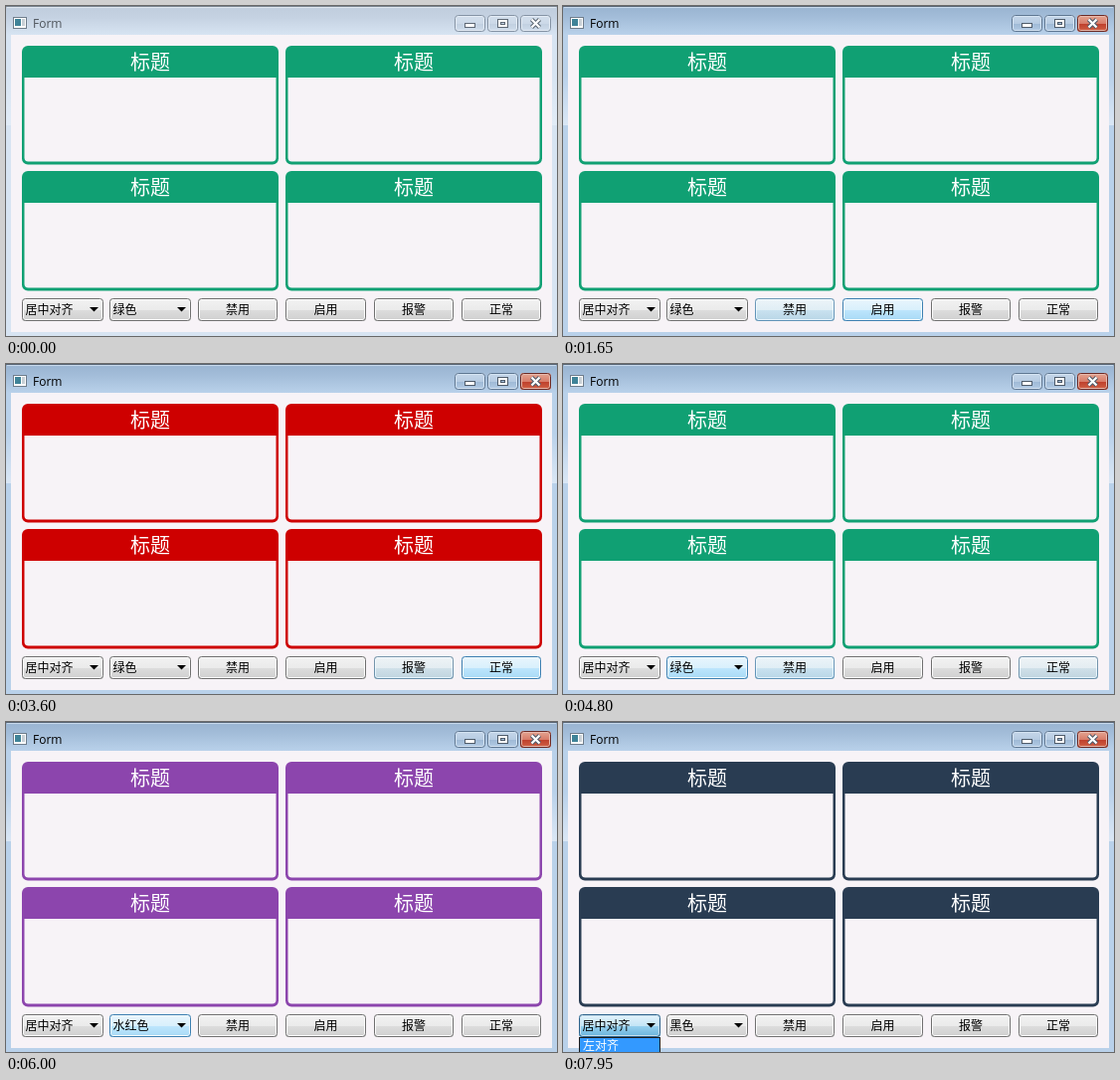
Animation of 554x332 px, one loop 8 s. Source, as an HTML page with a canvas:

```html
<!DOCTYPE html>
<html lang="zh-CN">
<head>
<meta charset="utf-8">
<title>Form</title>
<style>
html, body { margin: 0; width: 554px; height: 332px; overflow: hidden; }
canvas { display: block; }
</style>
</head>
<body>
<canvas id="stage" width="554" height="332"></canvas>
<script>
const ctx = document.getElementById('stage').getContext('2d');
const LOOP = 8000, STEP = 150, FADE = 750;
const CJK = '"Noto Sans CJK SC", "Noto Sans CJK", sans-serif';
const UI = '"Open Sans", "Noto Sans", sans-serif';

const GREEN = '#10a073', RED = '#ce0000', PURPLE = '#8c45ad', BLACK = '#293c52';
const ACTIVATE = 750, OPEN_LIST = 7950;

// [start, panel colour, colour name]
const phases = [
  [0, GREEN, '绿色'],
  [2550, RED, '绿色'],
  [3900, GREEN, '绿色'],
  [6000, PURPLE, '水红色'],
  [6900, BLACK, '黑色']
];

// hover: [enter, leave] pairs
const controls = [
  { x: 16, w: 82, text: () => '居中对齐', combo: true, hover: [[7650, 8000]] },
  { x: 104, w: 82, text: p => p[2], combo: true, hover: [[4650, 7050]] },
  { x: 193, w: 80, text: () => '禁用', hover: [[600, 1350], [4350, 4500]] },
  { x: 281, w: 81, text: () => '启用', hover: [[1500, 2250]] },
  { x: 370, w: 80, text: () => '报警', hover: [[2400, 3150]] },
  { x: 458, w: 80, text: () => '正常', hover: [[3300, 4350]] }
];

const skins = {
  normal: ['#707070', '#fcfcfc', '#f2f2f2', '#ebebeb', '#dddddd', '#cfcfcf'],
  hover: ['#3c7fb1', '#f2fafe', '#eaf6fd', '#d9f0fc', '#bee6fd', '#a7d9f5'],
  pressed: ['#2c628b', '#c8dfec', '#e5f4fc', '#c4e5f6', '#98d1ef', '#68b3db']
};

function vertical(y0, y1, stops) {
  const g = ctx.createLinearGradient(0, y0, 0, y1);
  stops.forEach(([at, color]) => g.addColorStop(at, color));
  return g;
}

function box(x, y, w, h, color) {
  ctx.fillStyle = color;
  ctx.fillRect(x, y, w, h);
}

function round(x, y, w, h, r) {
  ctx.beginPath();
  ctx.roundRect(x, y, w, h, r);
}

function outline(x, y, w, h, r, color) {
  round(x + 0.5, y + 0.5, w - 1, h - 1, r);
  ctx.strokeStyle = color;
  ctx.lineWidth = 1;
  ctx.stroke();
}

function label(text, x, y, size, color, align = 'left', family = CJK) {
  ctx.font = `${size}px ${family}`;
  ctx.textAlign = align;
  ctx.fillStyle = color;
  ctx.fillText(text, x, y);
}

function face(x, y, w, h, [edge, inner, a, b, c, d]) {
  round(x, y, w, h, 3);
  ctx.fillStyle = vertical(y, y + h, [[0, a], [0.5, b], [0.5, c], [1, d]]);
  ctx.fill();
  outline(x + 1, y + 1, w - 2, h - 2, 2, inner);
  outline(x, y, w, h, 3, edge);
}

function frame(active) {
  const tone = active
    ? ['#98b3d0', '#a3bdd9', '#b9d1ea', '#9db8d5', '#dae7f5', '#b9d1ea']
    : ['#bfcddd', '#c5d2e2', '#d7e4f2', '#cbd9e8', '#e2ecf7', '#d7e4f2'];
  box(0, 0, 554, 332, tone[5]);
  box(0, 0, 554, 29, vertical(0, 29, [[0, tone[0]], [0.4, tone[1]], [1, tone[2]]]));
  const side = vertical(29, 120, [[0, tone[2]], [0.45, tone[2]], [1, tone[4]]]);
  box(0, 29, 5, 91, side);
  box(549, 29, 5, 91, side);
  box(0, 0, 554, 1, active ? '#5d6b7b' : '#7d8894');
  box(1, 1, 552, 1, active ? '#c9dbee' : '#e0e8f1');
  box(5, 29, 544, 299, '#f7f3f7');

  // window icon
  box(7, 11, 14, 12, '#6f7d8b');
  box(8, 12, 12, 10, '#ffffff');
  box(9, 13, 6, 7, '#3f8398');
  box(16, 13, 3, 7, '#c8d0d6');
  label('Form', 27, 22, 12, active ? '#000000' : '#4f555c', 'left', UI);
}

function windowButtons(active) {
  const edge = active ? '#5f7792' : '#8593a4';
  const pale = active
    ? [edge, '#d5e4f3', '#c7d8ea', '#b6cbe2', '#9db8d5', '#b5cde6']
    : [edge, '#e4ecf5', '#d3dfec', '#ccd9e8', '#c0cfe0', '#d2dfed'];
  const red = ['#6b2a25', '#e9b9ac', '#e5a996', '#d87c69', '#bd3c29', '#d2664a'];
  face(451, 9, 31, 17, pale);
  face(484, 9, 31, 17, pale);
  face(517, 9, 31, 17, active ? red : pale);

  const ink = active ? '#4f5c6b' : '#5f6975';
  box(461, 17, 11, 5, ink);
  box(462, 18, 9, 3, '#ffffff');
  box(494, 13, 11, 9, ink);
  box(495, 14, 9, 7, '#ffffff');
  box(497, 16, 5, 3, ink);
  box(498, 17, 3, 1, pale[4]);

  ctx.lineCap = 'butt';
  for (const [color, width] of [[ink, 4.4], ['#ffffff', 2.2]]) {
    ctx.strokeStyle = color;
    ctx.lineWidth = width;
    ctx.beginPath();
    ctx.moveTo(528.5, 13.5);
    ctx.lineTo(536.5, 21.5);
    ctx.moveTo(536.5, 13.5);
    ctx.lineTo(528.5, 21.5);
    ctx.stroke();
  }
}

function panel(x, y, h, color) {
  round(x, y, 258, h, 6);
  ctx.fillStyle = color;
  ctx.fill();
  round(x + 2.5, y + 32, 253, h - 35, [0, 0, 4, 4]);
  ctx.fillStyle = '#f7f3f7';
  ctx.fill();
  label('标题', x + 129, y + 24, 20, '#ffffff', 'center');
}

function glow(spans, t) {
  return Math.max(0, ...spans.map(([enter, leave]) =>
    t < enter ? 0 : t < leave ? 1 : 1 - (t - leave) / FADE));
}

function control(c, t, phase, pressed) {
  const y = 294, h = 23;
  face(c.x, y, c.w, h, skins.normal);
  ctx.globalAlpha = pressed ? 1 : glow(c.hover, t);
  face(c.x, y, c.w, h, pressed ? skins.pressed : skins.hover);
  ctx.globalAlpha = 1;

  if (!c.combo) {
    label(c.text(phase), c.x + c.w / 2, 310, 12, '#000000', 'center');
    return;
  }
  label(c.text(phase), c.x + 3.5, 310, 12, '#000000');
  ctx.fillStyle = '#000000';
  ctx.beginPath();
  ctx.moveTo(c.x + 68, 303);
  ctx.lineTo(c.x + 77, 303);
  ctx.lineTo(c.x + 72.5, 307.5);
  ctx.fill();
}

function draw(t) {
  const phase = phases.filter(p => p[0] <= t).pop();
  const active = t >= ACTIVATE, open = t >= OPEN_LIST;

  frame(active);
  windowButtons(active);
  for (const x of [16, 281])
    for (const [y, h] of [[40, 119.5], [166, 120.5]]) panel(x, y, h, phase[1]);
  controls.forEach((c, i) => control(c, t, phase, open && i === 0));

  if (open) {
    box(16, 317, 82, 15, '#1c1c1c');
    box(17, 318, 80, 14, '#3399ff');
    label('左对齐', 20, 330, 12, '#ffffff');
  }
}

const start = performance.now();
function tick() {
  const t = (performance.now() - start) % LOOP;
  draw(Math.floor(t / STEP) * STEP);
  requestAnimationFrame(tick);
}
tick();
</script>
</body>
</html>
```
